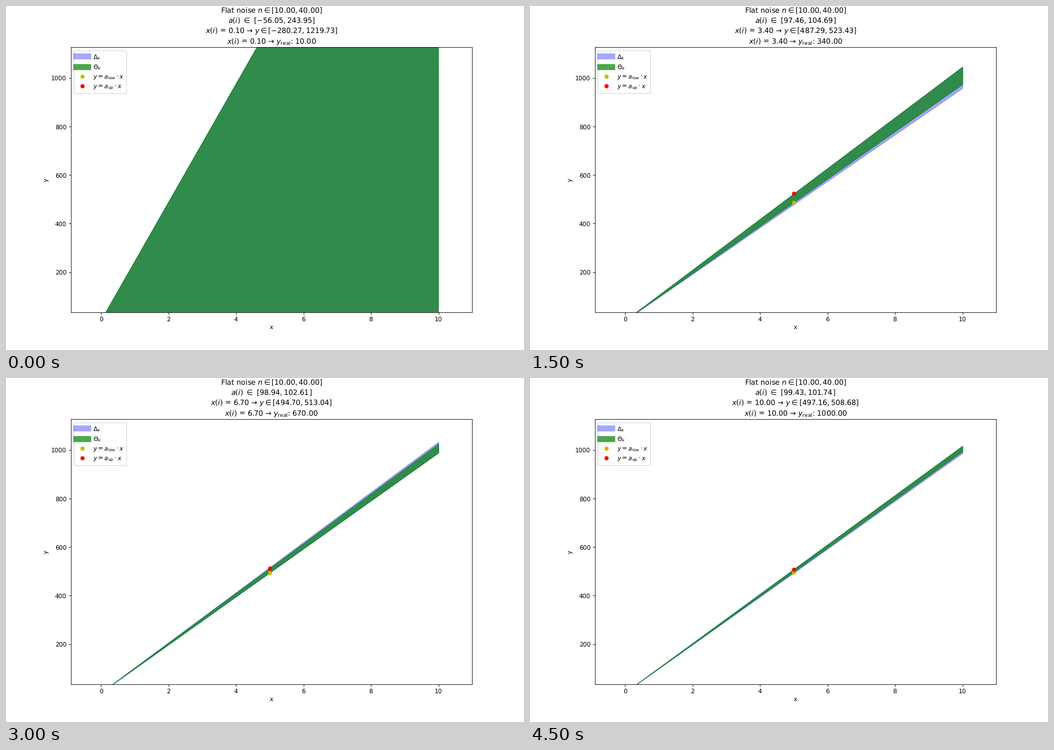
A matplotlib script for the animation above (5 s loop, 917 px wide and 611 px high).

```python
import numpy as np
import matplotlib.pyplot as plt
from matplotlib.animation import FuncAnimation
from matplotlib.lines import Line2D

plt.rcParams["text.hinting"] = "none"

DPI = 76.4
N_LOW, N_UP = 10, 40
X_PROBE = 5
X_MAX = 10

# Slope interval seen at each sample, and the running intersection of them.
xs = np.linspace(0.1, X_MAX, 10)
low = np.array([-56.054, 84.842, 97.458, 95.862, 96.700,
                97.251, 98.940, 99.432, 99.131, 98.736])
up = low + (N_UP - N_LOW) / xs
theta_low = np.maximum.accumulate(low)
theta_up = np.minimum.accumulate(up)
measured = low * xs + N_UP

fig, ax = plt.subplots(figsize=(917 / DPI, 611 / DPI), dpi=DPI)
line_x = np.array([0, X_MAX])


def wedge(lo, hi, color, alpha):
    return ax.fill_between(line_x, lo * line_x, hi * line_x,
                           color=color, alpha=alpha)


def title(i):
    x, lo, hi = xs[i], theta_low[i], theta_up[i]
    return "\n".join([
        rf"Flat noise $n \in [{N_LOW:.2f}, {N_UP:.2f}]$",
        rf"$a(i)$ $\in$ $[{lo:.2f}, {hi:.2f}]$",
        rf"$x(i)$ = {x:.2f} → "
        rf"$y \in [{X_PROBE * lo:.2f}, {X_PROBE * hi:.2f}]$",
        rf"$x(i)$ = {x:.2f} → "
        rf"$y_{{\mathrm{{real}}}}$: {100 * x:.2f}",
    ])


def draw(i):
    ax.clear()
    wedge(low[i], up[i], "b", 0.35)
    wedge(theta_low[i], theta_up[i], "g", 0.7)
    dot_low, = ax.plot(X_PROBE, X_PROBE * theta_low[i], "yo")
    dot_up, = ax.plot(X_PROBE, X_PROBE * theta_up[i], "ro")
    handles = [Line2D([], [], color="b", lw=10, alpha=0.35),
               Line2D([], [], color="g", lw=10, alpha=0.7),
               dot_low, dot_up]
    labels = [r"$\Delta_k$", r"$\Theta_k$",
              r"$y = a_{\mathrm{low}} \cdot x$",
              r"$y = a_{\mathrm{up}} \cdot x$"]
    ax.legend(handles, labels, loc="upper left", labelspacing=0.45)
    ax.set_xlim(xs[0] - 1, xs[-1] + 1)
    ax.set_ylim(measured[0], measured[-1] + 100)
    ax.set_xlabel("x")
    ax.set_ylabel("y")
    ax.set_title(title(i))
    return ax.get_children()


anim = FuncAnimation(fig, draw, frames=len(xs), init_func=lambda: draw(0),
                     interval=500, repeat=True, repeat_delay=0)
plt.show()
```
